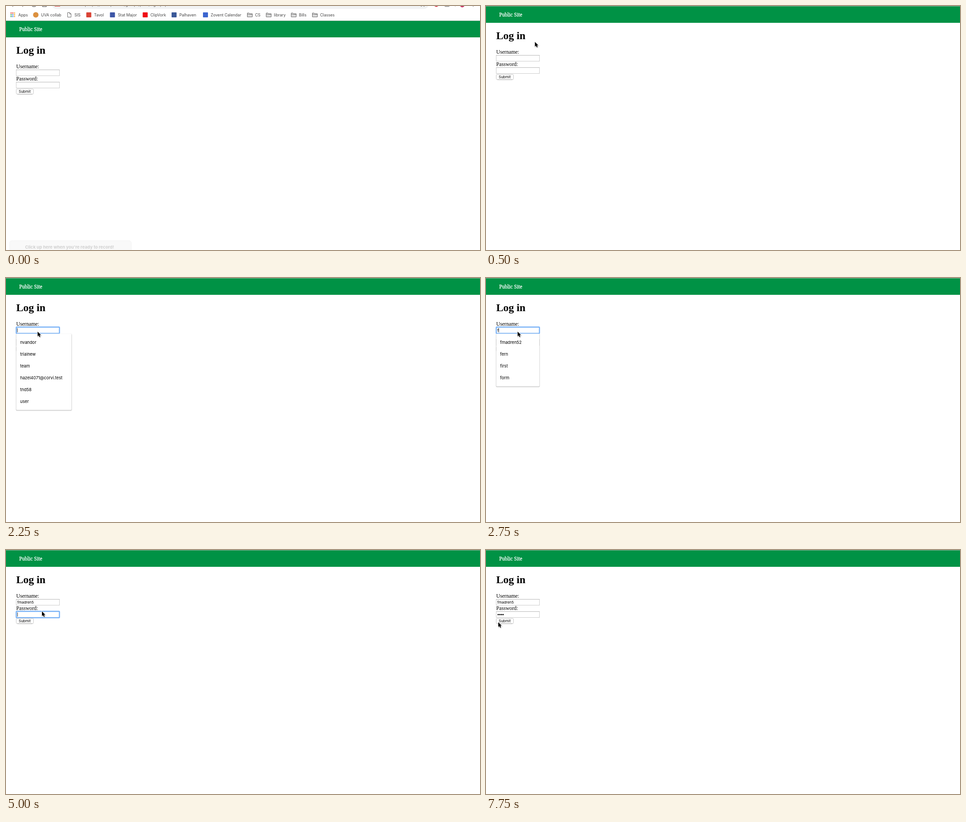
These frames come from a looping animation (1042 px wide and 537 px high, 8 s). An HTML page:

```html
<!DOCTYPE html>
<html lang="en">
<head>
<meta charset="utf-8">
<title>Log in</title>
<style>
html, body { margin: 0; width: 100%; height: 100%; overflow: hidden; background: #fff; }
svg { display: block; width: 1042px; height: 537px; }
.serif { font-family: "Liberation Serif", serif; font-size: 11.64px; }
.ui { font-family: Inter, sans-serif; font-size: 8px; }
.bar { font-size: 8.65px; fill: #454545; }
.option { font-size: 9.2px; }
text { white-space: pre; }
</style>
</head>
<body>
<svg id="stage" viewBox="0 0 1042 537">
  <rect width="1042" height="537" fill="#fff"/>
  <g id="toolbar"></g>
  <g id="page">
    <rect width="1042" height="37" fill="#009245"/>
    <rect width="1042" height="1" fill="#8fb39c"/>
    <text class="serif" x="29" y="23" fill="#fff" stroke="#fff" stroke-width=".3">Public Site</text>
    <text class="serif" x="22.5" y="73" style="font-size:23.3px;font-weight:bold">Log in</text>
    <text class="serif" x="22.5" y="105">Username:</text>
    <text class="serif" x="22.5" y="132">Password:</text>
    <g id="fields"></g>
    <rect x="22.5" y="150.5" width="38" height="11.5" rx="2.5" fill="#fff" stroke="#c6c6c6"/>
    <path d="M25 162.2H58" stroke="#aaa" stroke-width=".8"/>
    <text class="ui" x="28" y="159">Submit</text>
    <text id="typed" class="ui" x="24.7" y="118"></text>
    <g id="dots"></g>
    <path id="caret" stroke="#111" stroke-width=".9"/>
    <g id="menu"></g>
  </g>
  <g id="notice">
    <rect x="8" y="516.5" width="267.5" height="30" rx="5" fill="#f9f9f9" stroke="#efefef" stroke-dasharray="2 1"/>
    <text class="ui" x="42" y="533.5" fill="#d0d0d0" style="font-size:9.45px;font-weight:700">Click up here when you're ready to record!</text>
  </g>
  <g id="cursor">
    <path d="M0 0V10.4L2.4 8.2L4 11.9L6 11L4.4 7.5H7.5Z" transform="translate(.6 1.2)" fill="#000" opacity=".2" stroke="#000" stroke-width="1.4"/>
    <path d="M0 0V10.4L2.4 8.2L4 11.9L6 11L4.4 7.5H7.5Z" fill="#000" stroke="#fff" stroke-width="1.3" paint-order="stroke"/>
  </g>
</svg>
<script>
const $ = id => document.getElementById(id);
const rect = (x, y, w, h, fill, more = '') =>
  `<rect x="${x}" y="${y}" width="${w}" height="${h}" fill="${fill}" ${more}/>`;
const circle = (x, y, r, fill) => `<circle cx="${x}" cy="${y}" r="${r}" fill="${fill}"/>`;
const line = (d, color, width = 1) =>
  `<path d="${d}" fill="none" stroke="${color}" stroke-width="${width}"/>`;
const label = (x, y, text, kind) => `<text class="ui ${kind}" x="${x}" y="${y}">${text}</text>`;
const square = (x, color) => rect(x, 14, 11, 11, color, 'rx="1"');
const folder = x =>
  `<path d="M${x} 15.5h4l1.3 1.5h5.7v7h-11z" fill="#ddd" stroke="#666"/>` +
  line(`M${x} 18.5h11`, '#666', .8);

function drawToolbar() {
  const appColors = ['#e34133', '#e34133', '#f0a92e', '#38a153', '#4285f4', '#f0a92e', '#38a153', '#4285f4', '#f0a92e'];
  const bookmarks = [[27, 'Apps'], [77, 'UVA collab'], [150.5, 'SIS'], [193.5, 'Tavol'],
    [246, 'Stat Major'], [317.5, 'ClipVork'], [381, 'Palhaven'], [450, 'Zovent Calendar'],
    [547.5, 'CS'], [589, 'library'], [644, 'Bills'], [690.5, 'Classes']];
  $('toolbar').innerHTML =
    rect(101, -16, 828, 22.5, '#f1f3f4', 'rx="10"') +
    label(125, -.2, 'Not Secure | https://example.test/groups/polls/login.php', 'bar') +
    line('M12 -2L15.5 1M36 1L39.5 -2M57.5 0Q61.5 3 65.5 0M80.5 -2V1.5H88.5V-2', '#555', 1.2) +
    rect(107, -9, 12, 10, '#e33b36') +
    line('M912 1L916 -1L920 1', '#666') +
    circle(946, -3, 5, '#d63b48') + rect(964, -8, 11, 10, '#aaa', 'rx="2"') +
    line('M987.5 -5V2', '#ccc') + circle(1003, -2, 5, '#c73a64') + circle(1027, 0, 1, '#555') +
    appColors.map((c, i) => rect(10 + i % 3 * 3.8, 14.3 + (i / 3 | 0) * 3.8, 2.4, 2.4, c)).join('') +
    circle(65.5, 19.5, 6, '#dc913f') +
    '<path d="M135.5 14.5h4.5l3 3v7h-7.5zM140 14.5v3h3" fill="#fff" stroke="#666"/>' +
    square(176.5, '#d94436') + square(228.5, '#3d56a6') + square(300.5, '#f00d15') +
    square(364, '#3b5998') + square(433, '#3c66cf') +
    [530.5, 572, 627, 673.5].map(folder).join('') +
    bookmarks.map(([x, text]) => label(x, 22.7, text, 'bar')).join('');
}

const drawField = (y, focused) => focused
  ? rect(22.5, y, 95, 14, '#fff', 'stroke="#79b2f6" stroke-width="2.4" rx="1"')
  : rect(22.5, y + .5, 95, 13, '#fff', 'stroke="#ccc"') + line(`M22 ${y + .5}H118`, '#b5b5b5');

function drawMenu(options, width) {
  const height = options.length * 26 + 12.5;
  const shadow = 'rx="2" opacity=".12"';
  return rect(21.5, 122.5, width + 1, height + .5, '#000', shadow) +
    rect(22, 124, width, height, '#000', shadow) +
    rect(22.5, 122.5, width - 1, height - .5, '#fff', 'rx="1.5"') +
    options.map((text, i) => label(31, 145 + i * 26, text, 'option')).join('');
}

const user = 'fmadren5';
const recent = ['nvandor', 'trialnew', 'team', 'hazel4071@corvi.test', 'tnd58', 'user'];
const match = ['fmadren52'];

// Each entry overrides the state that came before it.
const steps = [
  [0, { toolbar: true, notice: true, cursor: null, focus: '', caret: false, typed: 0, dots: 0, menu: [] }],
  [250, { notice: false, cursor: [300, 125] }],
  [500, { toolbar: false, cursor: [107.5, 79] }],
  [750, { cursor: [92, 98] }],
  [1000, { cursor: [76, 113] }],
  [1250, { cursor: [69.5, 118] }],
  [1500, { focus: 'user', caret: true }],
  [1750, { menu: recent }],
  [2000, { caret: false }],
  [2250, { caret: true }],
  [2750, { typed: 1, menu: ['fmadren52', 'fern', 'first', 'form'] }],
  [3250, { typed: 2, menu: match }],
  [3500, { typed: 3 }],
  [3750, { typed: 4 }],
  [4000, { typed: 5 }],
  [4250, { typed: 7 }],
  [4500, { typed: 8 }],
  [5000, { focus: 'password', menu: [], cursor: [79, 135] }],
  [5250, { cursor: [83.5, 124] }],
  [5500, { dots: 1 }],
  [5750, { dots: 2 }],
  [6000, { dots: 3 }],
  [6250, { dots: 4 }],
  [6750, { cursor: [76, 160] }],
  [7000, { cursor: [60, 214], focus: '', caret: false }],
  [7250, { cursor: [44, 196] }],
  [7500, { cursor: [32, 172] }],
  [7750, { cursor: [27, 159] }],
];

const show = (id, visible) => $(id).setAttribute('display', visible ? 'inline' : 'none');

function render(time) {
  const state = Object.assign({}, ...steps.filter(([at]) => at <= time).map(([, change]) => change));
  const { cursor, focus, menu, dots } = state;
  show('toolbar', state.toolbar);
  show('notice', state.notice);
  show('cursor', cursor);
  show('caret', state.caret);
  $('page').setAttribute('transform', `translate(0 ${state.toolbar ? 32 : 0})`);
  if (cursor) $('cursor').setAttribute('transform', `translate(${cursor})`);
  $('fields').innerHTML = drawField(108, focus === 'user') + drawField(135, focus === 'password');
  $('typed').textContent = user.slice(0, state.typed);
  $('dots').innerHTML = Array.from({ length: dots }, (_, i) => circle(26.8 + i * 3.6, 142.2, 1.4, '#000')).join('');
  const caretX = focus === 'password' ? 25.3 + dots * 3.6
    : 25 + (state.typed ? $('typed').getComputedTextLength() : 0);
  $('caret').setAttribute('d', `M${caretX} ${focus === 'password' ? 137.5 : 110.5}v9`);
  $('menu').innerHTML = menu.length ? drawMenu(menu, menu === recent ? 122.5 : 96) : '';
}

drawToolbar();
let start, drawn;
function tick(now) {
  start ??= now;
  const time = Math.floor((now - start) % 8000 / 250) * 250;
  if (time !== drawn) render(drawn = time);
  requestAnimationFrame(tick);
}
render(0);
requestAnimationFrame(tick);
</script>
</body>
</html>
```
